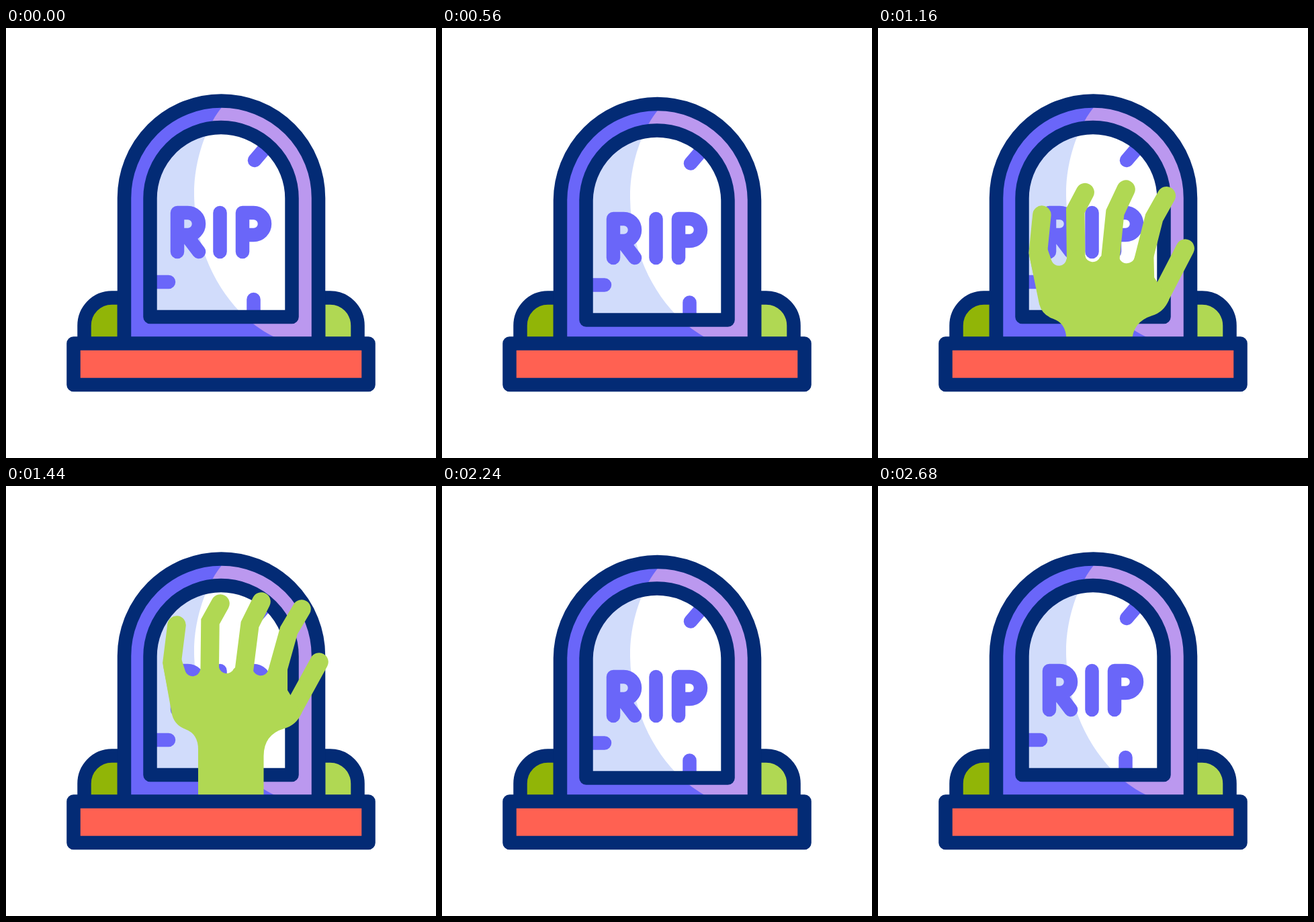
An HTML page for the animation above (2.8 s loop, 640x640 px).

```html
<!DOCTYPE html>
<html lang="en">
<head>
<meta charset="utf-8">
<title>Tombstone</title>
<style>
  html, body { margin: 0; width: 100%; height: 100%; overflow: hidden; background: #fff; }
  svg { display: block; width: 100%; height: 100%; }
  .line { fill: none; stroke-width: 20.5; stroke-linejoin: round; }
  .navy { stroke: #032b75; }
  .violet { stroke: #6a66f9; stroke-linecap: round; }
  .finger { fill: none; stroke: #b0d853; stroke-width: 27.5; stroke-linecap: round; }
</style>
</head>
<body>
<svg viewBox="0 0 640 640">
  <defs>
    <path id="slab" d="M176 490V253a144.5 144.5 0 0 1 289 0V490Z"/>
    <path id="plate" d="M214.5 430V253.5a105.5 105.5 0 0 1 211 0V430Z"/>
    <path id="light" d="M322 117C302 140 280 191 280 246C280 345 334 430 402 461L440 480H500V90H345Z"/>
    <clipPath id="inSlab"><use href="#slab"/></clipPath>
    <clipPath id="inPlate"><use href="#plate"/></clipPath>
    <clipPath id="aboveBase"><path d="M0 0H640V470H0Z"/></clipPath>
  </defs>

  <path class="line navy" style="fill:#91b507" d="M116.5 470V443a41 41.5 0 0 1 41-41.5H176V470"/>
  <path class="line navy" style="fill:#b0d853" d="M465 470V401.5h17.5a41 41.5 0 0 1 41 41.5V470"/>

  <g clip-path="url(#aboveBase)">
    <g id="stone">
      <use href="#slab" fill="#6a66f9"/>
      <use href="#light" fill="#bb98ef" clip-path="url(#inSlab)"/>
      <use href="#plate" fill="#d1dcfb"/>
      <use href="#light" fill="#fff" clip-path="url(#inPlate)"/>
      <path class="line violet" d="M370 197L388 176M222 378H242M368.5 404V430"/>
      <use href="#slab" class="line navy"/>
      <use href="#plate" class="line navy"/>
      <path id="letters" class="line violet" d="M255 333V275h15.5a16.5 16.5 0 0 1 0 33H255M268 308L287 333
        M318.5 275V333M352 333V275h16.5a16.5 16.5 0 0 1 0 33H352"/>
    </g>
    <g id="hand">
      <path class="finger" d="M254 207L247 263L258 320M319 175L304 202L303 290M380 172L363 206L353 285
        M440 183L421 215L402 283M466 262L427 333"/>
      <path fill="#b0d853" d="M234 268L247 340Q251 356 267 362Q286 369 286 392V900H383.5V402Q383.5 370 414 361
        Q432 356 440 338L419 304V270L404 262L391 272A12 12 0 0 1 367 268L353 260L339 272A11.5 11 0 0 1 317 270
        L303 260L289 274A11.5 11.5 0 0 1 267 276L260 254Z"/>
    </g>
  </g>

  <rect class="line navy" style="fill:#ff6152" x="100.5" y="469.5" width="439" height="61.5"/>
</svg>
<script>
  const LOOP = 2800, STEP = 40;
  const [stone, letters, hand] = ['stone', 'letters', 'hand'].map(id => document.getElementById(id));

  const ease = (t, from, to) => {
    const p = Math.min(1, Math.max(0, (t - from) / (to - from)));
    return p * p * (3 - 2 * p);
  };
  const dip = (t, from, mid, to) => ease(t, from, mid) - ease(t, mid, to);

  function draw(now) {
    const t = Math.floor(now % LOOP / STEP) * STEP;
    const sink = 4.5 * (dip(t, 240, 560, 880) + dip(t, 1920, 2240, 2560));
    const depth = 1 - dip(t, 880, 1280, 1280) - ease(t, 880, 1280) + 0;
    const buried = t < 1500 ? 1 - ease(t, 880, 1280) : ease(t, 1800, 2120);

    stone.setAttribute('transform', `translate(0 ${sink})`);
    letters.setAttribute('transform', `translate(0 ${sink})`);
    hand.setAttribute('transform',
      `translate(${-19 * buried} ${320 * buried}) rotate(${-6.3 * buried} 335 460)`);
    hand.setAttribute('visibility', buried < 1 ? 'visible' : 'hidden');
    requestAnimationFrame(() => draw(performance.now()));
  }
  draw(performance.now());
</script>
</body>
</html>
```
